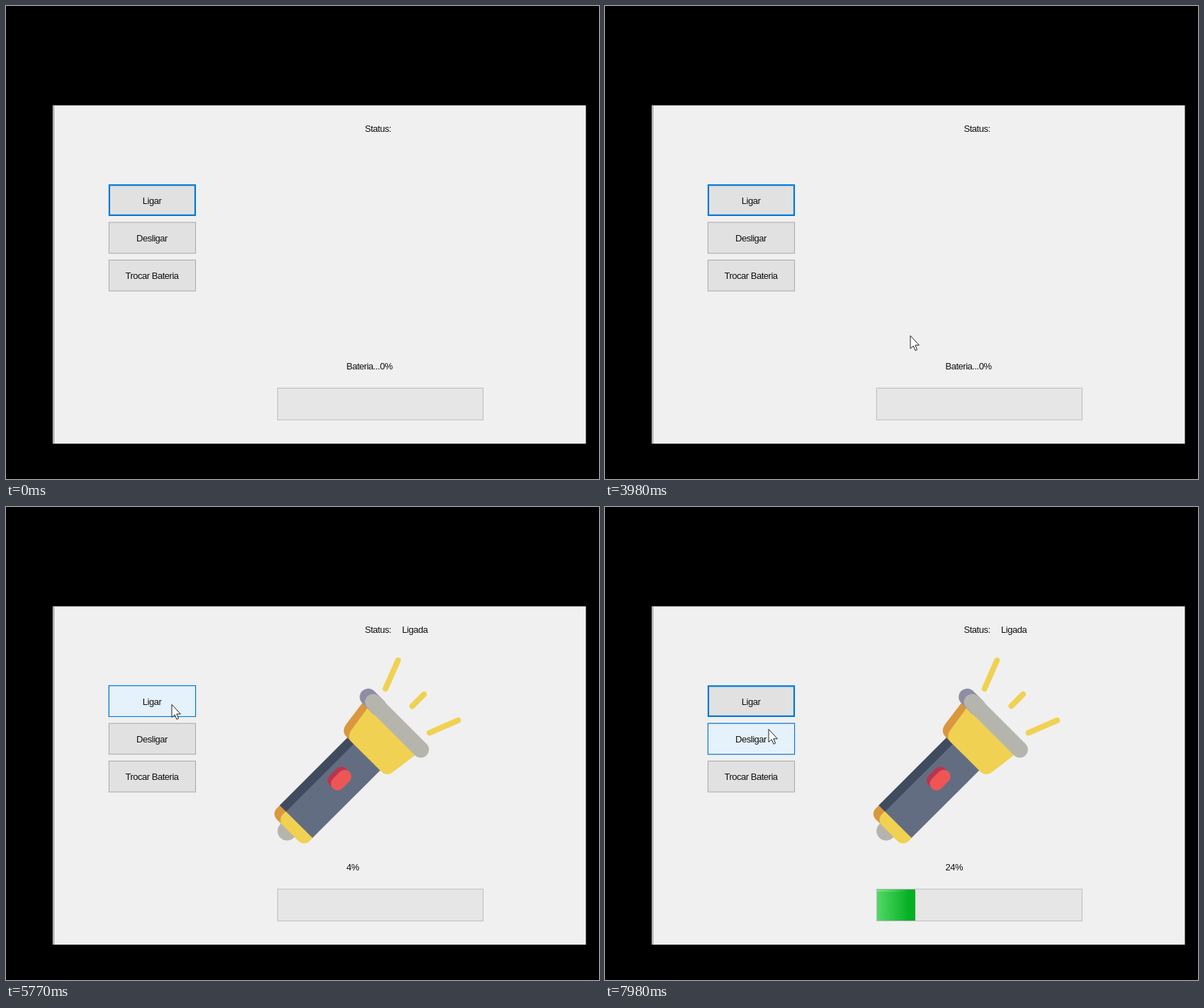
Recreate the animation shown at these times as an HTML page. Size 837x669 px, loop 8 s.

```html
<!DOCTYPE html>
<html lang="pt">
<head>
<meta charset="utf-8">
<title>Lanterna</title>
<style>
  html, body { margin: 0; width: 100%; height: 100%; overflow: hidden; background: #000; }
  svg { display: block; }
  text { font: 13px "Liberation Sans", Arial, sans-serif; letter-spacing: -.48px; fill: #111; }
  .mid { text-anchor: middle; }
  .cap { fill: none; stroke-linecap: round; }
</style>
</head>
<body>
<svg width="837" height="669" viewBox="0 0 837 669">
  <defs>
    <linearGradient id="shine">
      <stop offset="0" stop-color="#9fffa8" stop-opacity="0"/>
      <stop offset=".5" stop-color="#9fffa8" stop-opacity=".5"/>
      <stop offset="1" stop-color="#9fffa8" stop-opacity="0"/>
    </linearGradient>
  </defs>
  <rect width="837" height="669"/>
  <rect x="66" y="140.5" width="752.5" height="478.5" fill="#f0f0f0"/>
  <rect x="67" y="141" width="1" height="478" fill="#778"/>

  <text x="506.5" y="177.7">Status:</text>
  <text id="status" x="559" y="177.7">Ligada</text>
  <g id="buttons"></g>

  <!-- Drawn upright around the body's centre, then tilted -->
  <g id="torch" transform="translate(455 400) rotate(45)">
    <path class="cap" stroke="#f0d152" stroke-width="8"
          d="M-60 -199L-44 -158M0 -191V-167.5M60 -199L44 -158"/>
    <circle cy="82.4" r="13.5" fill="#b5b5ae"/>
    <rect x="-33" y="48" width="60" height="33" rx="11" fill="#d9973f"/>
    <rect x="-21" y="48" width="53.5" height="33" rx="11" fill="#f0d152"/>
    <rect x="-33" y="-74" width="65.3" height="138" fill="#636d82"/>
    <rect x="-33" y="-74" width="12.5" height="138" fill="#414b5e"/>
    <path fill="#d9973f" d="M-53 -122L-48 -84Q-46 -71 -34 -71H0V-122Z"/>
    <path fill="#f0d152" d="M-43 -122L-37 -84Q-35 -71 -24 -71H34Q46 -71 47 -84L52 -122Z"/>
    <g class="cap">
      <path stroke="#8f8da3" stroke-width="24" d="M-53 -132.5h20"/>
      <path stroke="#b5b5ae" stroke-width="23" d="M-43 -132.5H52"/>
      <path stroke="#b9354f" stroke-width="19" d="M-3.5 -15.5v-14"/>
      <path stroke="#ee5656" stroke-width="19" d="M3 -15.5v-14"/>
    </g>
  </g>

  <text id="level" x="480.5" y="514.2"></text>
  <rect x="383.4" y="540.4" width="290" height="45" fill="#e6e6e6" stroke="#bcbcbc"/>
  <svg id="bar" x="384" y="541" width="0" height="44">
    <rect width="290" height="44" fill="#06b025"/>
    <g id="glint" fill="url(#shine)">
      <rect width="90" height="44"/>
      <rect y="1" width="90" height="2"/>
    </g>
  </svg>

  <path id="cursor" fill="#fff" stroke="#222"
        d="M0 .3V18.5L4.2 14.8L7 21.3L9.6 20.1L6.9 13.8H12.4Z"/>
</svg>
<script>
const LOOP = 8000, APPEAR = 2210, PRESS = 5210, CLICK = 5300, LEAVE = 7730;
const TICK = 109.4, BAR_START = 5903, BAR_SPEED = .026;
const $ = id => document.getElementById(id);
const clamp = v => Math.max(0, Math.min(1, v));
const easeOut = k => 1 - (1 - k) ** 1.66;

// Each pointer stroke starts where the previous one ended
const strokes = [
  { from: 2710, to: 2830, end: [128, 525] },
  { from: 3080, to: 3380, end: [161, 553] },
  { from: 3650, to: 4440, end: [286, 308], bend: [[100, 690], [769, 377]] },
  { from: 4440, to: 4980, end: [234, 279] },
  { from: LEAVE, to: 7980, end: [231, 314] }
];

function bezier(a, b, c, d, u) {
  const v = 1 - u;
  return a * v ** 3 + 3 * b * u * v ** 2 + 3 * c * u ** 2 * v + d * u ** 3;
}

function pointerAt(t) {
  let pos = [92, 555];
  for (const { from, to, end, bend } of strokes) {
    if (t < from) break;
    const u = easeOut(clamp((t - from) / (to - from)));
    pos = pos.map((p, i) => bend
      ? bezier(p, bend[0][i], bend[1][i], end[i], u)
      : p + (end[i] - p) * u);
  }
  return pos.map(Math.round);
}

function box(y, fill, stroke, id = "", line = 1.1) {
  return `<rect ${id && `id="${id}"`} x="${144.8 + line / 2}" y="${y + line / 2}"
    width="${123.3 - line}" height="${44.8 - line}"
    fill="${fill}" stroke="${stroke}" stroke-width="${line}"/>`;
}

function button(row, label, id, focused) {
  const y = 252.2 + row * 53.3;
  return (focused ? box(y, "#e1e1e1", "#0078d7", "", 2.2) : box(y, "#e1e1e1", "#adadad")) +
    (id ? box(y, "#e5f1fb", "#0078d7", id + "Hover") : "") +
    (focused ? box(y, "#cce4f7", "#005499", id + "Down") : "") +
    `<text class="mid" x="206" y="${y + 27.4}">${label}</text>`;
}

$("buttons").innerHTML = button(0, "Ligar", "on", true) +
  button(1, "Desligar", "off") + button(2, "Trocar Bateria");

const fade = (id, v) => $(id).setAttribute("opacity", v);
const show = (id, on) => $(id).setAttribute("visibility", on ? "visible" : "hidden");

function render(t) {
  const lit = t >= CLICK;
  show("torch", lit);
  show("status", lit);
  show("cursor", t >= APPEAR);
  $("cursor").setAttribute("transform", `translate(${pointerAt(t)})`);

  fade("onHover", clamp((t - 4580) / 200) * clamp((7950 - t) / 130));
  fade("onDown", clamp((t - PRESS) / 60) * clamp((CLICK + 150 - t) / 150));
  fade("offHover", clamp((t - 7870) / 100));

  const percent = Math.floor((t - CLICK) / TICK);
  $("level").textContent = percent > 0 ? percent + "%" : "Bateria...0%";
  $("bar").setAttribute("width", Math.max(0, Math.round((t - BAR_START) * BAR_SPEED)));
  $("glint").setAttribute("transform", `translate(${(t - LEAVE) * .2 - 95})`);
  show("glint", t >= LEAVE);
}

function frame(now) {
  render(now % LOOP);
  requestAnimationFrame(frame);
}
render(0);
requestAnimationFrame(frame);
</script>
</body>
</html>
```
